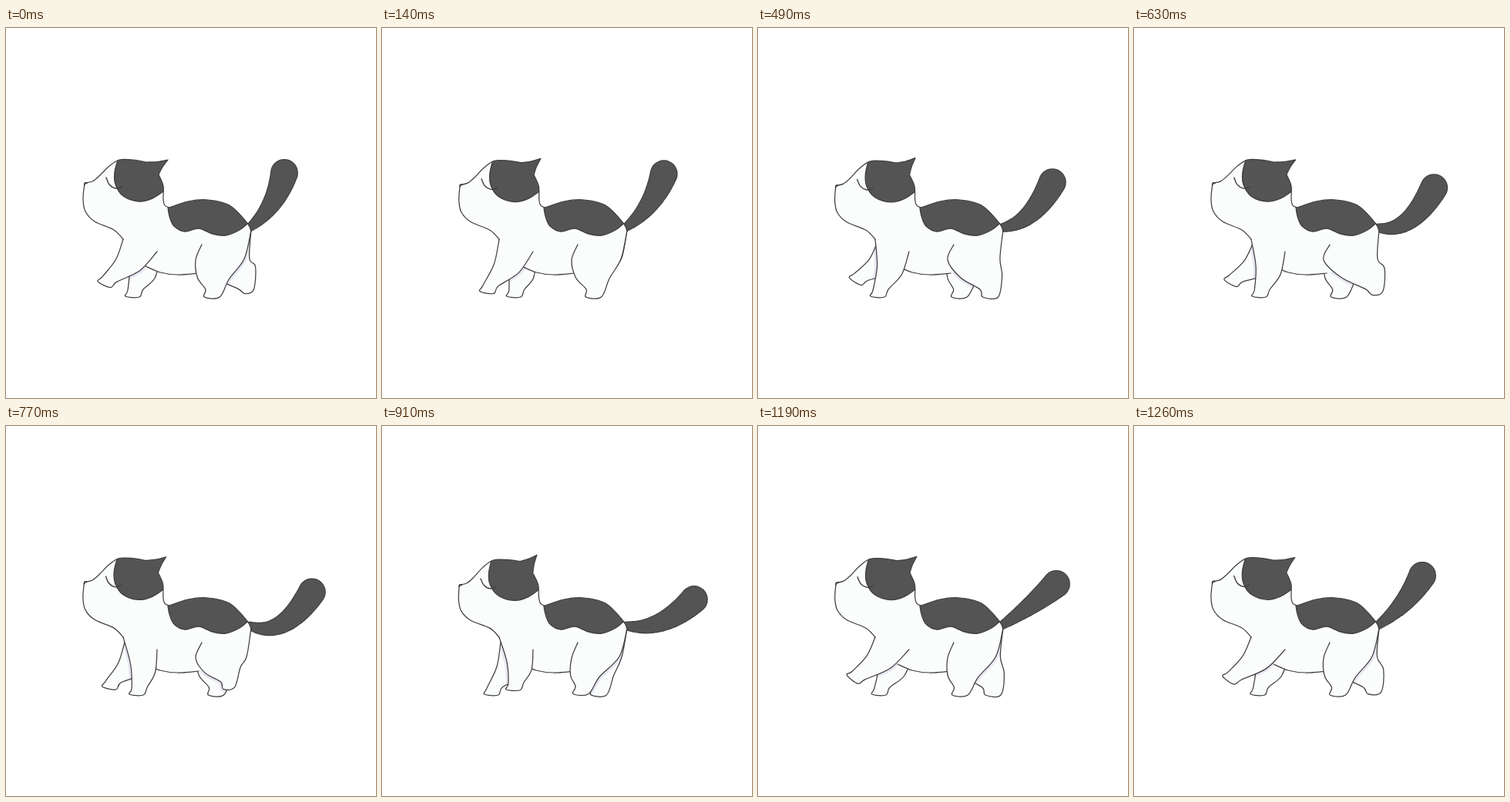
Recreate the animation shown at these times as an HTML page with a canvas. Size 480x480 px, loop 1.33 s.

```html
<!DOCTYPE html>
<html lang="en">
<head>
<meta charset="utf-8">
<title>Walking cat</title>
<style>
  html, body { margin: 0; width: 100%; height: 100%; overflow: hidden; background: #fff; }
  canvas { display: block; width: 480px; height: 480px; }
</style>
</head>
<body>
<canvas id="stage" width="480" height="480"></canvas>
<script>
const ctx = document.getElementById('stage').getContext('2d');
const LOOP = 1330, STEP = 70, GROUND = 349;
const INK = '#404040', FUR = '#fbfdfd', PATCH = '#545454', SHADE = '#e7e7f3';
const { PI, sin, cos, min, max } = Math;

// Paw cycles: x range, landing time, swing length, and the time in the air.
const FORE = { reach: 120, trail: 173, land: 1240, swing: 390, ease: .85, liftAt: 840, air: 690, rise: 20 };
const HIND = { reach: 258, trail: 317, land: 910, swing: 270, ease: 2, liftAt: 560, air: 370, rise: 9 };

const wrap = t => (t % LOOP + LOOP) % LOOP;
const mid = (a, b, dx = 0, dy = 0) => [(a[0] + b[0]) / 2 + dx, (a[1] + b[1]) / 2 + dy];

function gait(t, g) {
  const p = wrap(t - g.land), stance = LOOP - g.swing;
  const back = p < stance ? (p / stance) ** g.ease : .5 + .5 * cos(PI * (p - stance) / g.swing);
  const q = wrap(t - g.liftAt) / g.air;
  const lift = q < 1 ? sin(PI * q) : 0;
  return { back, lift, x: g.reach + (g.trail - g.reach) * back, y: GROUND - lift * g.rise };
}

// Returns a function that places points relative to a tilted paw.
function pawFrame({ x, y }, tilt) {
  const c = cos(tilt), s = sin(tilt);
  return (dx, dy) => [x + dx * c - dy * s, y + dx * s + dy * c];
}

// Legs run from the front of the thigh, round the paw, and up the back.
function foreleg(t, front, rear) {
  const paw = gait(t, FORE);
  const at = pawFrame(paw, .65 * paw.lift * (1 - paw.back) ** 2);
  const ankle = at(-6, -9), heel = at(14, -10);
  return [front, mid(front, ankle, 4, 2), ankle, at(-9, -1), at(9, 0), heel, mid(heel, rear, 4, 5), rear];
}

function hindleg(t) {
  const paw = gait(t, HIND), b = paw.back;
  const at = pawFrame(paw, -.6 * paw.lift * b * b);
  const half = 10 - 5 * paw.lift * b;
  const thigh = [246, 301], ankle = at(3 - half - 9 * b, -10), heel = at(half, 0);
  return [[254, 281], thigh, mid(thigh, ankle, -4, 4), ankle, at(-half, 0), heel,
    [heel[0] + 14 - 12 * b, heel[1] - 22 - 8 * b], [308 + 8 * b, 299], [318, 262]];
}

// Smooth curve through points.
function spline(path, p, join) {
  const at = i => p[max(0, min(p.length - 1, i))];
  if (!join) path.moveTo(...p[0]);
  for (let i = 0; i < p.length - 1; i++) {
    const [a, b, c, d] = [at(i - 1), at(i), at(i + 1), at(i + 2)];
    path.bezierCurveTo(
      b[0] + (c[0] - a[0]) / 6, b[1] + (c[1] - a[1]) / 6,
      c[0] - (d[0] - b[0]) / 6, c[1] - (d[1] - b[1]) / 6, ...c);
  }
  return path;
}
const curve = p => spline(new Path2D(), p);

// Lowers and turns points of the head, fading out toward the chest.
function nodded(points, nod) {
  return points.map(([x, y]) => {
    const k = x < 215 ? nod * max(0, min(1, (270 - y) / 70)) : 0;
    return [x + k * (.06 * (y - 215) - 1.5), y + k * (.06 * (160 - x) + 3.5)];
  });
}

function fill(path, color) {
  ctx.fillStyle = color;
  ctx.fill(path);
}

function ink(path, width = 1.25, color = INK) {
  ctx.lineWidth = width;
  ctx.strokeStyle = color;
  ctx.stroke(path);
}

function within(path, draw) {
  ctx.save();
  ctx.clip(path);
  draw();
  ctx.restore();
}

function drawTail(t) {
  const down = min(1, t / 1050);
  const s = t < 1050 ? down ** 1.2 : (LOOP - t) / (LOOP - 1050);
  const tip = [361 + 52 * s, 188 + 48 * s ** 1.5];
  const bend = [350 + 13 * s, 233 + 44 * sin(PI * down ** 2.4)];
  for (const [grow, color] of [[.5, INK], [-.7, PATCH]]) {
    ctx.fillStyle = color;
    ctx.beginPath();
    for (let k = 0; k <= 1; k += 1 / 64) {
      const u = 1 - k;
      const x = u * u * 316 + 2 * u * k * bend[0] + k * k * tip[0];
      const y = u * u * 259 + 2 * u * k * bend[1] + k * k * tip[1];
      const r = 5 + 12.5 * k ** .9 + grow;
      ctx.moveTo(x + r, y);
      ctx.arc(x, y, r, 0, 2 * PI);
    }
    ctx.fill();
  }
}

function drawFarLeg(leg, near) {
  const path = curve(leg);
  fill(path, FUR);
  within(path, () => ink(near, 7, SHADE));
  ink(path);
}

function drawPatch(body, edge, top) {
  const path = curve(edge), area = new Path2D(path);
  for (const p of top) area.lineTo(...p);
  within(body, () => { fill(area, PATCH); ink(path, 1.4); });
}

function draw(t) {
  const nod = .9 * sin(PI * t / (LOOP / 2)) ** 2;
  const pose = points => nodded(points, nod);

  const chin = pose([[152, 274], [140, 262], [115, 251], [103, 238], [100, 222], [102, 201]]);
  const brow = pose([[102, 201], [112, 199], [122, 191], [133, 180], [147, 171], [165, 171], [182, 174]]);
  const nape = pose([[198, 190], [204, 205], [204, 222], [206, 230], [212, 233]]);
  const back = pose([[212, 233], [236, 225], [262, 223], [290, 230], [313, 253], [318, 264]]);
  const mask = pose([[146, 168], [141, 187], [142, 203], [152, 218], [172, 225], [190, 221], [207, 210]]);
  const saddle = pose([[210, 232], [212, 244], [218, 257], [232, 264], [250, 260], [268, 267],
    [285, 269], [303, 262], [315, 252]]);
  const eye = pose([[130, 194], [134, 203], [142, 208], [150, 206]]);
  const ear = [210 - 12 * nod, 171 - 5 * nod];
  const belly = [[250, 318], [222, 320], [200, 317], [181, 309], [166, 295], [152, 274]];

  const outline = curve(chin);
  spline(outline, brow, true);
  spline(outline, [brow[6], mid(brow[6], ear, 0, 1), ear], true);
  spline(outline, [ear, mid(ear, nape[0], -1, 0), nape[0]], true);
  spline(outline, nape, true);
  spline(outline, back, true);
  const body = new Path2D(outline);
  body.lineTo(300, 300);
  body.lineTo(...belly[0]);
  spline(body, belly, true);

  const fore = curve(foreleg(t, [152, 274], [196, 290]));
  const hind = curve(hindleg(t));
  const later = t + LOOP / 2;

  ctx.fillStyle = '#fff';
  ctx.fillRect(0, 0, 480, 480);
  ctx.lineJoin = ctx.lineCap = 'round';
  drawTail(t);
  drawFarLeg(foreleg(later, [154, 280], [200, 300]), fore);
  drawFarLeg(hindleg(later), hind);

  fill(body, FUR);
  ink(curve(belly.slice(0, 4)));
  fill(fore, FUR);
  fill(hind, FUR);
  drawPatch(body, mask, [[225, 200], [225, 150], [mask[0][0], 150]]);
  drawPatch(body, saddle, [[315, 215], [saddle[0][0], 215]]);
  for (const path of [outline, fore, hind]) ink(path);
  ink(curve(eye), 1.4);

  const [nx, ny] = brow[0];
  ink(curve([[nx, ny + 2], [nx + 1, ny], [nx + 3, ny]]), 2);
}

let shown = -1;
function tick() {
  const step = Math.floor(performance.now() % LOOP / STEP);
  if (step !== shown) draw((shown = step) * STEP);
  requestAnimationFrame(tick);
}
tick();
</script>
</body>
</html>
```
